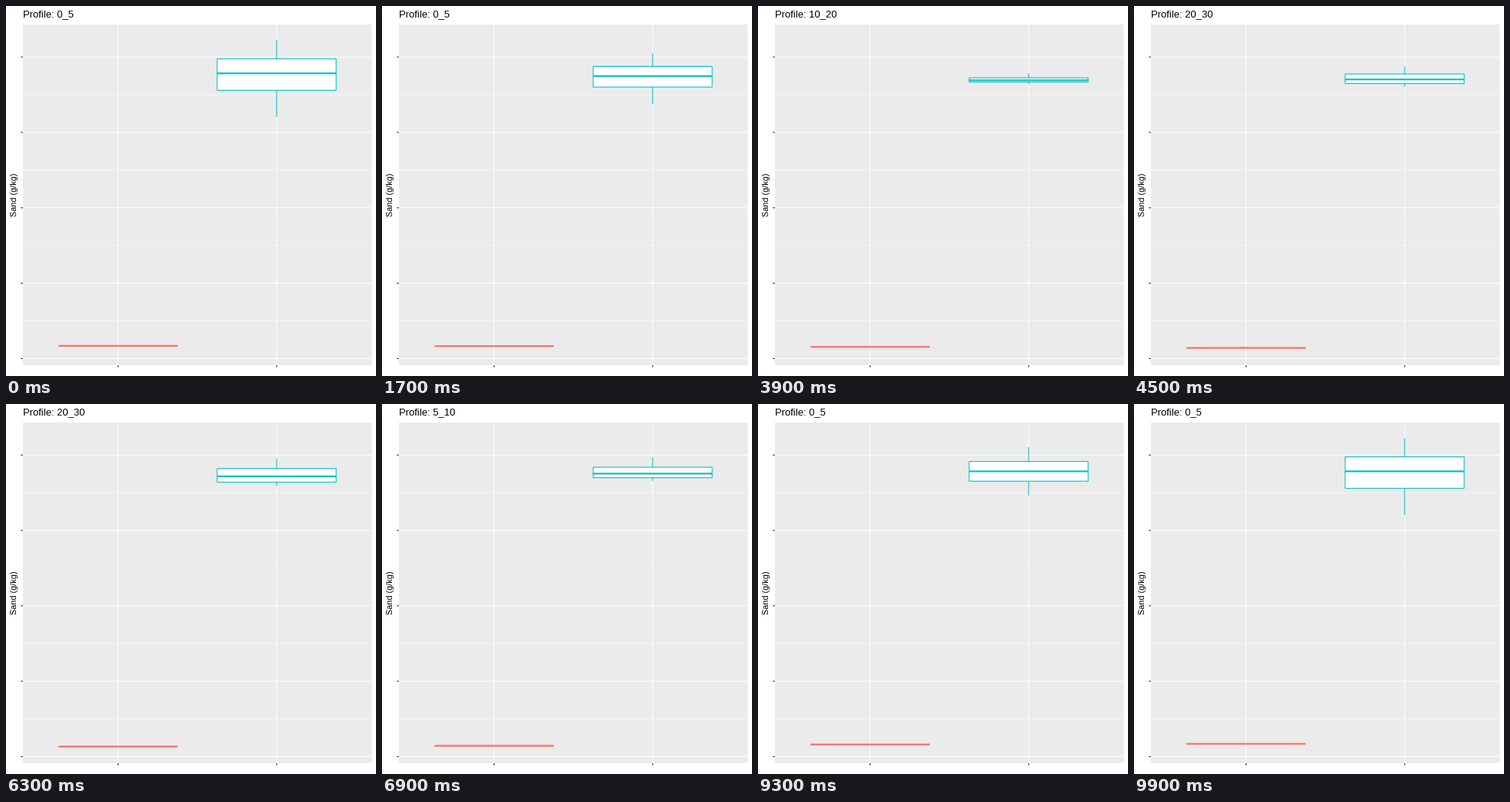
Write a matplotlib script that moves like this. It is 480 px wide and 480 px high and loops after 10000 ms.

```python
import matplotlib.pyplot as plt
from matplotlib.animation import FuncAnimation
from matplotlib.patches import Rectangle
import numpy as np

SIZE, FRAMES, INTERVAL = 480, 100, 100
LEFT, RIGHT, TOP, BOTTOM = 22, 474.5, 24, 466
UNIT = (RIGHT - LEFT) / 2.2
CENTRES = [LEFT + 0.6 * UNIT, LEFT + 1.6 * UNIT]
HALF = 0.375 * UNIT
RED, TEAL = "#F8766D", "#00BFC4"
LINE = 1.07

# Each depth: centre of the tight red group, four teal samples (y in px).
DEPTHS = {
    "0_5": (440.8, [44.1, 76.8, 97.9, 143.8]),
    "10_20": (442.0, [89.0, 95.6, 97.4, 101.0]),
    "20_30": (444.6, [71.0, 88.3, 100.5, 107.6]),
    "5_10": (442.6, [68.1, 84.8, 90.0, 93.8]),
}
NAMES = list(DEPTHS)
# Frames at which the depth alternately starts and stops changing.
KEYS = [0, 12, 25, 38, 50, 62, 74, 87, 99]


def five_numbers(samples):
    return np.percentile(samples, [0, 25, 50, 75, 100])


STATS = np.array([
    [five_numbers(np.linspace(mid - 0.5, mid + 0.5, 4)), five_numbers(teal)]
    for mid, teal in DEPTHS.values()])


def line(xs, ys, color, width=LINE, z=2):
    return ax.plot(xs, ys, color=color, lw=width, zorder=z, snap=False,
                   solid_capstyle="butt")[0]


def draw_panel():
    ax.add_patch(Rectangle((LEFT, TOP), RIGHT - LEFT, BOTTOM - TOP,
                           fc="#EBEBEB", ec="none", zorder=0, snap=False))
    for k in range(5):
        y = 66.2 + 97.8 * k
        line([LEFT, RIGHT], [y, y], "white")
        line([LEFT - 2.75, LEFT], [y, y], "#333333")
        if k < 4:
            line([LEFT, RIGHT], [y + 48.9] * 2, "white", LINE / 2, 1)
    for x in CENTRES:
        line([x, x], [TOP, BOTTOM], "white")
        line([x, x], [BOTTOM, BOTTOM + 2.75], "#333333")
    ax.text(14, 245, "Sand (g/kg)", fontsize=10.7, rotation=90,
            rotation_mode="anchor", ha="center", va="baseline")


class Box:
    def __init__(self, x, color):
        self.whiskers = [line([x, x], [0, 0], color, z=3) for _ in range(2)]
        self.body = ax.add_patch(Rectangle(
            (x - HALF, 0), 2 * HALF, 0, fc="white", ec=color, lw=LINE,
            zorder=4, snap=False, joinstyle="miter"))
        self.median = line([x - HALF, x + HALF], [0, 0], color, 2 * LINE, 5)

    def update(self, stats):
        high, upper, mid, lower, low = stats
        self.whiskers[0].set_ydata([high, upper])
        self.whiskers[1].set_ydata([lower, low])
        self.body.set_y(upper)
        self.body.set_height(lower - upper)
        self.median.set_ydata([mid, mid])


def pose(frame):
    """Nearest depth name and linearly blended statistics."""
    phase = np.interp(frame, KEYS, np.arange(len(KEYS)) // 2)
    i, n = int(phase), len(NAMES)
    now, following = STATS[i % n], STATS[(i + 1) % n]
    return NAMES[int(phase + 0.5) % n], now + (phase - i) * (following - now)


plt.rcParams["font.family"] = "Liberation Sans"
fig = plt.figure(figsize=(SIZE / 72, SIZE / 72), dpi=72, facecolor="white")
ax = fig.add_axes([0, 0, 1, 1])
ax.set(xlim=(0, SIZE), ylim=(SIZE, 0))
ax.axis("off")
draw_panel()
title = ax.text(LEFT, 14, "", fontsize=13, va="baseline")
boxes = [Box(x, c) for x, c in zip(CENTRES, (RED, TEAL))]


def update(frame):
    name, stats = pose(frame)
    title.set_text(f"Profile: {name}")
    for box, values in zip(boxes, stats):
        box.update(values)
    return [title]


anim = FuncAnimation(fig, update, frames=FRAMES, interval=INTERVAL,
                     repeat=True, repeat_delay=0, blit=False)
plt.show()
```
